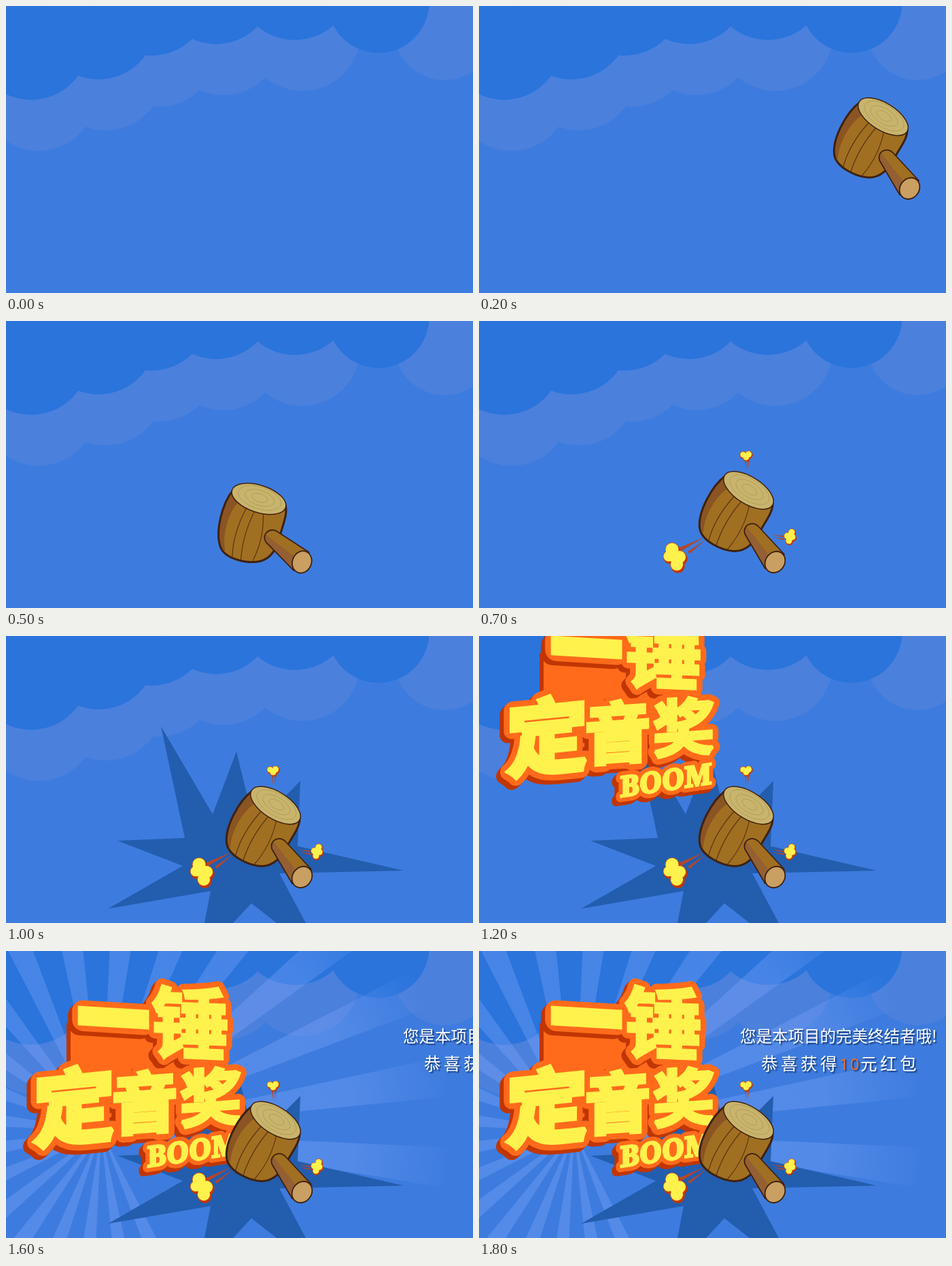
Write an HTML page with a canvas that moves like this. It is 687 by 422 pixels and loops after 1.9 s.

```html
<!DOCTYPE html>
<html lang="zh">
<head>
<meta charset="utf-8">
<style>
html, body { margin: 0; width: 100%; height: 100%; overflow: hidden; background: #3d7cde; }
canvas { display: block; }
</style>
</head>
<body>
<canvas id="stage" width="687" height="422"></canvas>
<script>
const ctx = document.getElementById('stage').getContext('2d');
const CJK = '"Noto Sans CJK SC", "Noto Sans CJK", sans-serif';
const YELLOW = '#fff24d', ORANGE = '#ff6b1b', RED = '#c03604', BROWN = '#3f2110';
const RAD = Math.PI / 180;

function shape(d, fill, stroke, width = 1.5) {
  const path = new Path2D(d);
  if (fill) { ctx.fillStyle = fill; ctx.fill(path); }
  if (stroke) { ctx.strokeStyle = stroke; ctx.lineWidth = width; ctx.stroke(path); }
}

function disc(x, y, r, fill) {
  ctx.fillStyle = fill;
  ctx.beginPath();
  ctx.arc(x, y, r, 0, 7);
  ctx.fill();
}

function ellipse(x, y, rx, ry, angle, fill, stroke, width) {
  ctx.beginPath();
  ctx.ellipse(x, y, rx, ry, angle * RAD, 0, 7);
  if (fill) { ctx.fillStyle = fill; ctx.fill(); }
  ctx.strokeStyle = stroke;
  ctx.lineWidth = width;
  ctx.stroke();
}

// Clouds: x and lowest point of each bulge
const bulges = [[37, 138], [136, 108], [214, 73], [309, 56], [425, 50]];

function sky() {
  ctx.fillStyle = '#3d7cde';
  ctx.fillRect(0, 0, 687, 422);
  for (const [x, y] of bulges) disc(x + 11, y - 10, 85, '#4b80dd');
  disc(645, 35, 74, '#4b80dd');
  for (const [x, y] of bulges) disc(x, y - 85, 85, '#2a74dc');
  disc(548, -5.5, 74.5, '#2a74dc');
}

function rays() {
  const cx = 140, cy = 265, reach = 515;
  const glow = ctx.createRadialGradient(cx, cy, 0, cx, cy, reach);
  glow.addColorStop(0, 'rgba(135,170,255,.32)');
  glow.addColorStop(0.72, 'rgba(135,170,255,.3)');
  glow.addColorStop(1, 'rgba(135,170,255,0)');
  ctx.fillStyle = glow;
  // The fan leaves the lower right open
  for (let angle = 66; angle <= 366; angle += 15) {
    ctx.beginPath();
    ctx.moveTo(cx, cy);
    ctx.arc(cx, cy, reach, (angle - 3.3) * RAD, (angle + 3.3) * RAD);
    ctx.fill();
  }
}

function burst(scale) {
  ctx.save();
  ctx.translate(350, 315);
  ctx.scale(scale, scale);
  ctx.translate(-350, -315);
  shape('M228 133L304 262L339 170L363 268L372 275L433 213L429 309L585 345L402 349L472 480' +
    'L361 393L281 479L301 375L150 401L260 338L164 301L263 297Z', '#235dae');
  ctx.restore();
}

// Lettering by line: text, centre x, centre y, size, slope, emboldening, rim
const lines = [
  [['一', 158, 99, 96, 0.06, 16, 17], ['锤', 271, 106, 114, 0.04, 4, 17]],
  [['定', 100, 228, 119, -0.1, 8, 17], ['音', 204, 223, 96, -0.07, 6, 17],
    ['奖', 301, 215, 90, -0.07, 5, 17]],
  [['BOOM', 275, 293, 42, -0.15, 3, 12]]
];

function letterLayer(line, dx, dy, color, rimmed) {
  ctx.fillStyle = ctx.strokeStyle = color;
  ctx.lineJoin = rimmed ? 'round' : 'miter';
  ctx.miterLimit = 2;
  for (const [text, x, y, size, slope, bold, rim] of line) {
    const latin = text.length > 1;
    ctx.save();
    ctx.transform(1, slope, 0, 1, x + dx, y + dy);
    ctx.font = `900 ${size}px ` + (latin ? '"Noto Serif", serif' : CJK);
    ctx.lineWidth = bold + (rimmed ? rim : 0);
    const base = size * (latin ? 0.357 : 0.38);
    ctx.strokeText(text, 0, base);
    ctx.fillText(text, 0, base);
    ctx.restore();
  }
}

function title(dy) {
  const extrude = paint => {
    for (let i = 6; i > 0; i -= 2) paint(-i, dy + i, RED);
    paint(0, dy, ORANGE);
  };
  ctx.save();
  ctx.textAlign = 'center';
  extrude((dx, y, color) => {
    ctx.save();
    ctx.translate(dx, y);
    shape('M95 100L220 108L312 165L300 225L110 250L95 170Z', color);
    ctx.restore();
  });
  for (const line of lines) {
    extrude((dx, y, color) => letterLayer(line, dx, y, color, true));
  }
  for (const line of lines) letterLayer(line, 0, dy, YELLOW, false);
  ctx.restore();
}

function hammer(dx, dy, angle) {
  ctx.save();
  ctx.translate(435 + dx, 355 + dy);
  ctx.rotate(angle * RAD);
  ctx.translate(-435, -355);
  const head = 'M362 228C343 242 322 280 324.5 304C327 324 358 338 376 338.5' +
    'C394 338 404 326 413 310C423 292 433 280 432 267Z';
  shape(head, '#a06f21');
  shape('M362 228C343 242 322 280 325 306L330 311C331 286 350 255 367 246Z', '#8a5423');
  shape('M376 257Q347 289 338 322M387 264Q360 295 349 330M398 269Q391 306 366 335',
    null, '#5e3512', 1.2);
  shape(head, null, BROWN, 3);
  ellipse(396.5, 249, 41.5, 20, 32, '#c8b46c', BROWN, 1.5);
  for (const k of [0.8, 0.55, 0.3]) ellipse(398, 248, 41 * k, 20 * k, 32, null, '#ad9850', 0.8);
  const handle = 'M391 313C388 300 401 294 410 301L449 343L421 364Z';
  shape(handle, '#a06f21');
  shape('M391 313C390 308 391 305 394 303L431 350L421 364Z', '#945f33');
  shape(handle, null, BROWN, 1.8);
  ellipse(435.5, 354.5, 14, 16.5, 35, '#c99f62', BROWN, 1.8);
  ctx.restore();
}

function puff(drop, balls) {
  for (const [x, y, r] of balls) disc(x + drop * 0.6, y + drop, r + 1.2, RED);
  for (const [x, y, r] of balls) disc(x, y, r + 0.8, '#d8540f');
  for (const [x, y, r] of balls) disc(x, y, r, YELLOW);
}

function puffs() {
  shape('M331 318L293 334L296 339ZM333 322L307 339L310 342ZM393 220L391 204L393 204Z' +
    'M395 219L396 204L398 205ZM430 314L448 316L447 318ZM432 318L449 320L448 322Z', '#b5452a');
  puff(2.5, [[284, 336, 9.5], [279, 346, 7.5], [295, 347, 9], [291, 358, 9], [287, 346, 9]]);
  puff(1, [[388.5, 196.5, 4], [396.5, 196, 4.5], [393, 200, 4.5]]);
  puff(1, [[460, 310.5, 4.5], [453.5, 316, 4.5], [461, 317.5, 4.5], [456, 323, 4.5], [457, 316, 5]]);
}

function message(dx) {
  ctx.save();
  ctx.textAlign = 'left';
  ctx.shadowColor = 'rgba(10,35,90,.8)';
  ctx.shadowOffsetX = ctx.shadowOffsetY = 2;
  ctx.shadowBlur = 2;
  const write = (text, x, y, size, gap, color = '#fff', family = CJK) => {
    ctx.font = `500 ${size}px ${family}`;
    ctx.letterSpacing = gap + 'px';
    ctx.fillStyle = color;
    ctx.fillText(text, x + dx, y);
  };
  write('您是本项目的完美终结者哦!', 384, 133.5, 23.5, 0);
  write('恭喜获得', 415, 175, 24.5, 4.5);
  write('10', 530, 174.5, 24, 2, ORANGE, '"Open Sans", sans-serif');
  write('元红包', 561, 175, 24.5, 4.5);
  ctx.restore();
}

function draw(now) {
  const step = Math.floor(now % 1900 / 100);
  ctx.lineJoin = ctx.lineCap = 'round';
  sky();
  if (step >= 14) rays();
  if (step >= 9) burst(step === 9 ? 0.6 : 1);
  if (step >= 11) title(-81 * Math.max(0, 13 - step));
  if (step >= 7) puffs();
  if (step >= 1) {
    const left = Math.max(0, 5 - step);
    hammer(66 * left, -23.5 * left - 1.75 * left * left, step === 5 ? -14 : 0);
  }
  if (step >= 16) message(100 * (18 - step));
}

const start = performance.now();
function loop() {
  draw(performance.now() - start);
  requestAnimationFrame(loop);
}
loop();
</script>
</body>
</html>
```
